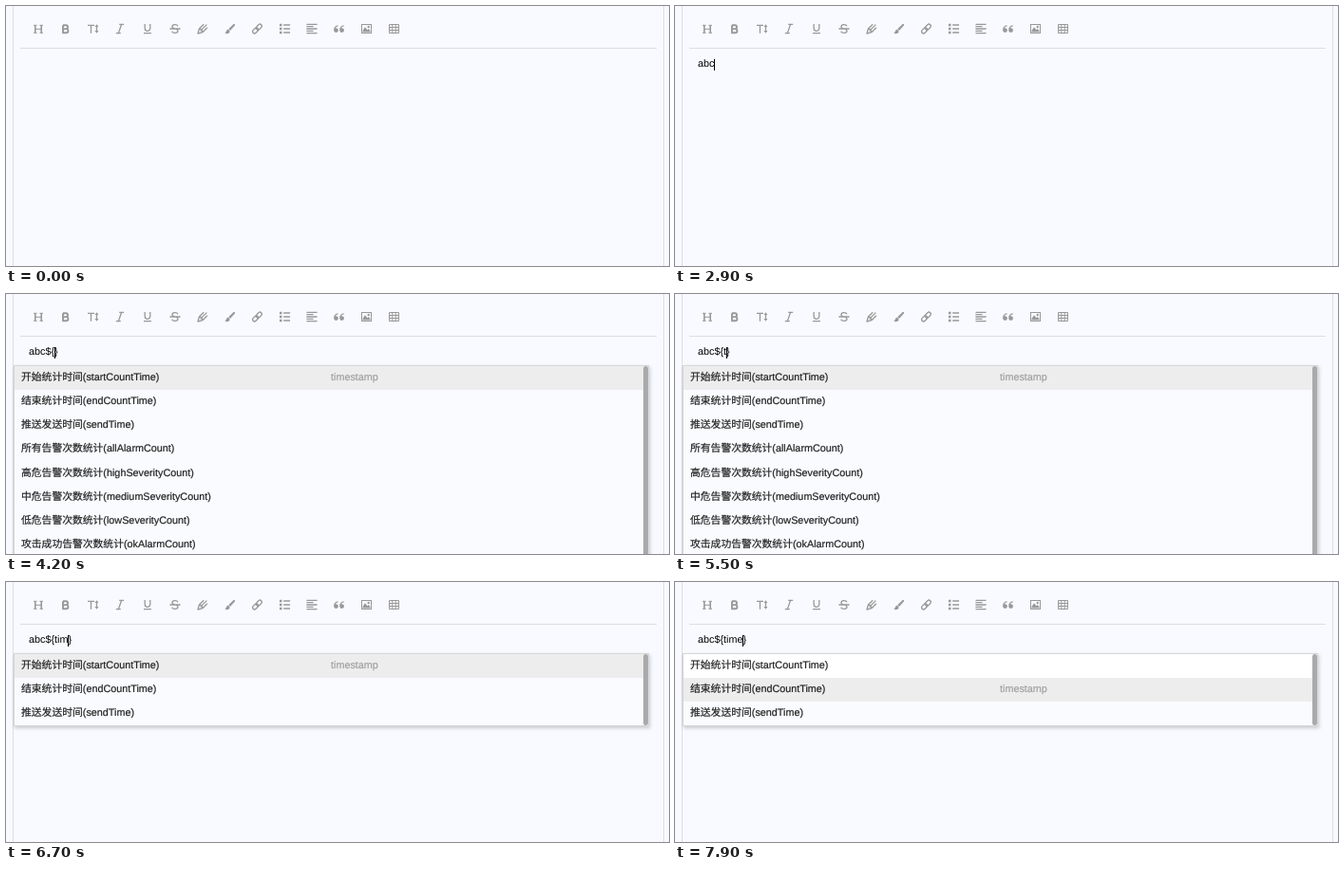
Recreate the animation shown at these times as an HTML page. Size 698 by 274 pixels, loop 8000 ms.

```html
<!DOCTYPE html>
<html lang="zh-CN">
<head>
<meta charset="utf-8">
<title>Template editor</title>
<style>
  html, body { margin: 0; width: 100%; height: 100%; overflow: hidden; background: #f9faff; }
  body {
    position: relative;
    font: 10.8px/25.14px "Liberation Sans", "Noto Sans CJK SC", "Noto Sans CJK", sans-serif;
    text-rendering: geometricPrecision;
    color: #222;
  }
  .frame { position: absolute; left: 7px; top: 0; width: 684px; height: 274px; border: solid #dcdde6; border-width: 0 1px; }
  .rule { position: absolute; left: 15px; top: 44px; width: 670px; height: 1px; background: #dcdde2; }
  svg { position: absolute; left: 0; top: 0; }
  .line { fill: none; stroke: #999; stroke-width: 1.3; }
  .solid { fill: #999; }
  #text { position: absolute; left: 24px; top: 49px; white-space: pre; color: #000; }
  #caret { position: absolute; top: 56px; width: 1px; height: 12px; background: #000; }
  #popup {
    position: absolute; left: 8px; top: 75px; width: 667px;
    border: 1px solid #d6d6d8; background: #fafbff;
    box-shadow: 1px 2px 4px rgba(0, 0, 0, .2);
  }
  .row { position: relative; height: 25.14px; padding-left: 7px; white-space: pre; -webkit-text-stroke: .2px; }
  .row.done { background: #fff; }
  .row.active { background: #ededed; }
  .row.active::after { content: "timestamp"; position: absolute; left: 333px; top: 0; color: #a0a0a0; }
  .bar { position: absolute; right: 0; top: 0; bottom: 0; width: 5px; border-radius: 3px; background: #aaa; }
</style>
</head>
<body>
<div class="frame"></div>
<div class="rule"></div>
<svg width="698" height="48">
  <g transform="translate(34 24.3)" class="line">
    <path d="M-3.2-4V4M3.2-4V4" stroke-width="1.6"/>
    <path d="M-3 0H3M-5-4H-1.4M1.4-4H5M-5 4H-1.4M1.4 4H5" stroke-width="1"/>
  </g>
  <path transform="translate(62.5 24.2)" class="line" stroke-linejoin="round" style="stroke-width:1.9"
    d="M-2.5-4H.6a1.9 1.9 0 0 1 0 3.9H-2.5M.6-.1h.3a2.05 2.05 0 0 1 0 4.1H-2.5V-4"/>
  <g transform="translate(91.5 24)">
    <path class="line" d="M-5.5-3.7H1.5M-2-3.7V4.8M4-3V3"/>
    <path class="solid" d="M2-2L4-4.8 6-2zM2 2L4 4.8 6 2z"/>
  </g>
  <path transform="translate(120 24)" class="line" d="M1.6-4.5L-1.6 4.5M-.8-4.6H4.2M-4.2 4.6H.8"/>
  <path transform="translate(149 24)" class="line" d="M-2.8-5V-.5a2.8 2.8 0 0 0 5.6 0V-5M-4 4.7H4"/>
  <path transform="translate(178 24)" class="line" d="M3-2.8C2.2-5-3-5.2-3-2.3C-3 .5 3-.5 3 2.3C3 5-2.5 5-3.4 2.7M-5.6 0H5.6"/>
  <path transform="translate(207 24)" class="line" stroke-linejoin="round" d="M1.3-4.8L-3.6 0-5 5 0 3.7 5-1.3M-2.4 2.4L4.4-4.4M-3.6 0C-2 0 0 2 0 3.7"/>
  <g transform="translate(236 24)">
    <path class="solid" d="M-1.8.2L3.6-5Q5.6-5.6 5-3.6L0 2Q-.4.8-1.8.2z"/>
    <path class="solid" d="M-5.6 4.6C-4 4-4.4 1.6-2.6.8A2.2 2.2 0 0 1-.4 3C-.8 5.4-3.8 5.8-5.6 4.6z"/>
  </g>
  <g transform="translate(264.5 24) rotate(-45)" class="line">
    <rect x="-6" y="-2" width="6.8" height="4" rx="2"/>
    <rect x="-.8" y="-2" width="6.8" height="4" rx="2"/>
  </g>
  <g transform="translate(293.5 24)">
    <path class="solid" d="M-5.5-5.2h2.5v2.5h-2.5zM-5.5-1.2h2.5v2.5h-2.5zM-5.5 2.8h2.5v2.5h-2.5z"/>
    <path class="line" d="M-1.3-4H5.6M-1.3 0H5.6M-1.3 4H5.6"/>
  </g>
  <path transform="translate(322 24)" class="line" d="M-5.6-4.6H5.6M-5.6-2.3H1.6M-5.6 0H5.6M-5.6 2.3H1.6M-5.6 4.6H5.6"/>
  <g transform="translate(350.5 24)" class="solid">
    <path id="quote" d="M-.6 1.6A2.4 2.4 0 1 1-5.4 1.6C-5.6-1.4-3.8-3.5-1-3.8V-2.5C-2.6-2.2-3.4-1.4-3.6-.7A2.4 2.4 0 0 1-.6 1.6z"/>
    <use href="#quote" x="6.1"/>
  </g>
  <g transform="translate(379.5 24)">
    <rect class="line" x="-5" y="-4.5" width="10" height="9" style="stroke-width:1"/>
    <path class="solid" d="M-4 3.6V2L-1.6-1.8 1 1.2 2.2 0 4 2.2V3.6z"/>
    <circle class="solid" cx="2.2" cy="-2" r="1.2"/>
  </g>
  <path transform="translate(408.5 24)" class="line" style="stroke-width:1" d="M-5-4.5H5V4.5H-5zM-5-1.5H5M-5 1.5H5M-1.7-4.5V4.5M1.7-4.5V4.5"/>
</svg>
<div id="text"></div>
<div id="caret"></div>
<div id="popup"><div id="rows"></div><div class="bar"></div></div>
<script>
  const LOOP = 8000;
  const $ = id => document.getElementById(id);

  const times = ['开始统计时间(startCountTime)', '结束统计时间(endCountTime)', '推送发送时间(sendTime)'];
  const counts = ['所有告警次数统计(allAlarmCount)', '高危告警次数统计(highSeverityCount)',
    '中危告警次数统计(mediumSeverityCount)', '低危告警次数统计(lowSeverityCount)', '攻击成功告警次数统计(okAlarmCount)'];
  const assets = ['当天已失陷资产数(fallAssetCount)', '当天高风险资产数(highAssetCount)',
    '当天中风险资产数(mediumAssetCount)', '当天低风险资产数(lowAssetCount)'];

  // [start ms, text before the caret]
  const typed = [[0, ''], [2200, 'a'], [2700, 'ab'], [2900, 'abc'], [4100, 'abc$'], [4200, 'abc${'],
    [5500, 'abc${t'], [5800, 'abc${ti'], [6700, 'abc${tim'], [6900, 'abc${time']];
  const PICK = 7800;

  const pen = document.createElement('canvas').getContext('2d');
  pen.font = '108px "Liberation Sans", sans-serif';
  const widthOf = s => pen.measureText(s).width / 10;

  function suggestions(text) {
    const query = text.split('{')[1];
    if (query === undefined) return [];
    if (query.length < 2) return [...times, ...counts];
    return query === 'ti' ? [...times, ...assets] : times;
  }

  let shown = '';
  function render(t) {
    const [start, text] = typed.filter(step => step[0] <= t).pop();
    const picked = t >= PICK ? 1 : 0;

    // The caret is solid after a key press, then toggles every 500 ms.
    const phase = start ? t - start : t + 400;
    $('caret').style.opacity = Math.floor(phase / 500) % 2 === (start ? 0 : 0) && t >= 600 ? 1 : 0;

    const key = text + '|' + picked;
    if (key === shown) return;
    shown = key;
    $('text').textContent = text + (text.includes('{') ? '}' : '');
    $('caret').style.left = Math.floor(24 + widthOf(text)) + 'px';

    const list = suggestions(text);
    $('popup').style.display = list.length ? '' : 'none';
    $('rows').replaceChildren(...list.map((label, i) => {
      const row = document.createElement('div');
      row.className = 'row' + (i === picked ? ' active' : i < picked ? ' done' : '');
      row.textContent = label;
      return row;
    }));
  }

  function tick() {
    render(performance.now() % LOOP);
    requestAnimationFrame(tick);
  }
  render(0);
  tick();
</script>
</body>
</html>
```
